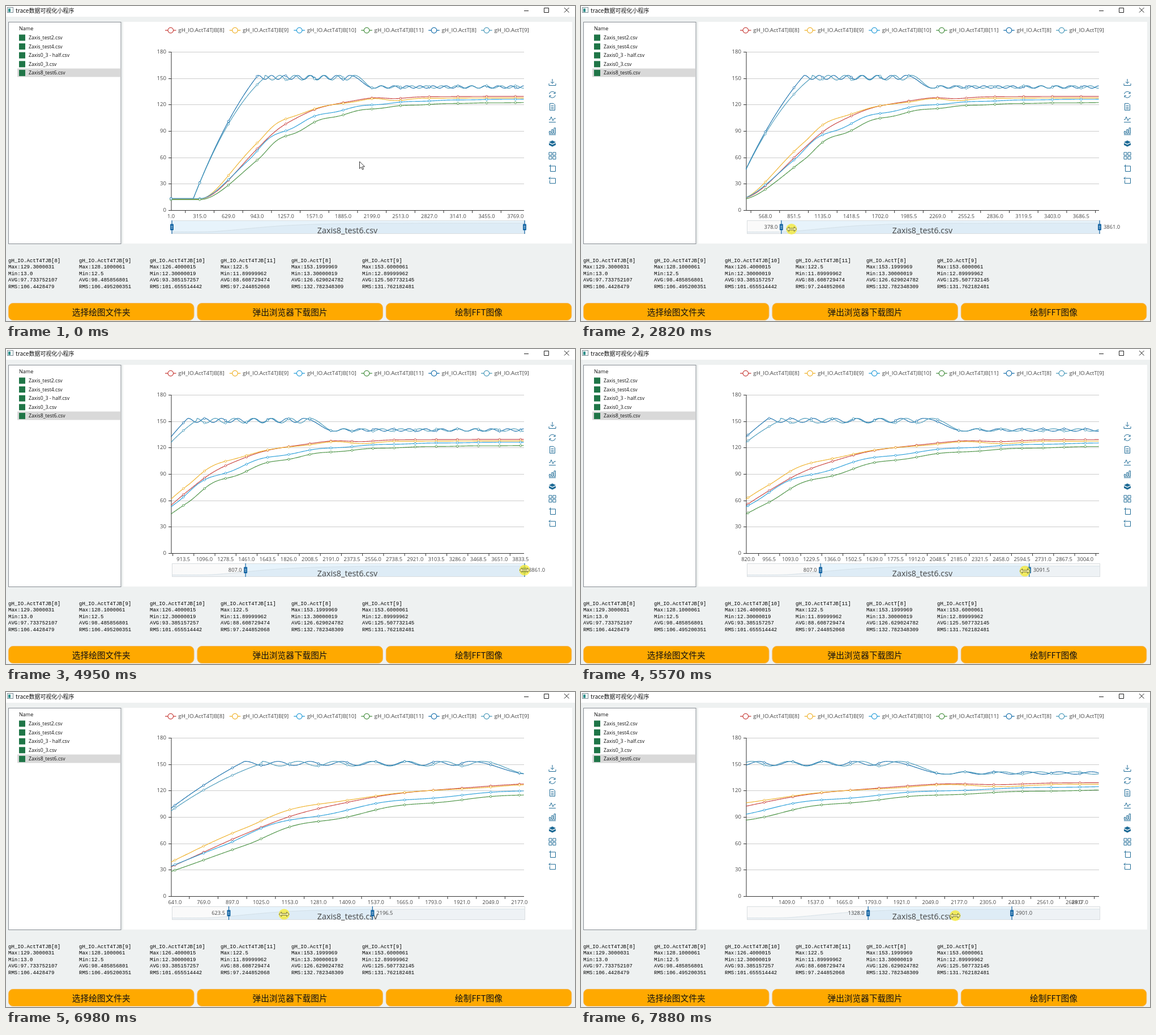
Write an HTML page that moves like this. It is 1005 px wide and 557 px high and loops after 8 s.

```html
<!DOCTYPE html>
<html lang="zh">
<head>
<meta charset="utf-8">
<style>
html, body { margin: 0; width: 100%; height: 100%; overflow: hidden; background: #eef1f1; }
svg { display: block; width: 100%; height: 100%; }
text { font-family: "Open Sans", "Noto Sans CJK SC", "Noto Sans", sans-serif; dominant-baseline: central; fill: #464646; white-space: pre; }
.cjk { font-family: "Noto Sans CJK SC", "Noto Sans CJK", sans-serif; }
.mono { font-family: "Liberation Mono", monospace; fill: #000; }
.dark { fill: #111; }
</style>
</head>
<body>
<svg viewBox="0 0 1005 557"><g id="fixed"></g><g id="live"></g></svg>
<script>
const LOOP = 8000, L = 291.5, W = 623, Y0 = 361, UNIT = 280 / 180;
const FIRST = 1, LAST = 3861, SLIDER = 293.5;
const COLORS = ['#c9433f', '#efb22c', '#2b9fd9', '#4a9244', '#1b72ad', '#4b9bbb'];
const NAMES = ['T4TJB[8]', 'T4TJB[9]', 'T4TJB[10]', 'T4TJB[11]', 'T[8]', 'T[9]'].map(n => 'gH_IO.Act' + n);
const BLUE = '#1e6b96', HANDLE = '#1767a5';

// ---- markup helpers
const text = (x, y, s, size, extra = '') => `<text x="${x}" y="${y}" font-size="${size}" ${extra}>${s}</text>`;
const rect = (x, y, w, h, fill, extra = '') => `<rect x="${x}" y="${y}" width="${w}" height="${h}" fill="${fill}" ${extra}/>`;
const path = (d, stroke, extra = '', fill = 'none') => `<path d="${d}" fill="${fill}" stroke="${stroke}" ${extra}/>`;
const circle = (x, y, r, fill, extra = '') => `<circle cx="${x}" cy="${y}" r="${r}" fill="${fill}" ${extra}/>`;
const MID = 'text-anchor="middle"', END = 'text-anchor="end"';
const within = (v, a, b) => v >= a && v < b;

// ---- data curves
// Winding temperature: slow start, exponential approach, fading ripple, small overshoot at the end.
function winding({ low, high, inertia, drag, ripple = 0, onset = 640, period = 450, fade = 700, settle = 0 }) {
  return x => {
    const u = Math.max(0, x - 315), r = u - onset, z = u - 2030;
    const base = high - (high - low) * Math.exp(-u * u / (inertia + drag * u));
    const wobble = r > 0 ? ripple * Math.sin(Math.PI * r / period) ** 2 * Math.exp((period / 2 - r) / fade) : 0;
    return base + wobble - settle * Math.sin(Math.PI * z / 340) * Math.exp(-((z / 300) ** 2));
  };
}
// Motor load: climb to the peak, swing, drop to the lower level, swing less.
function motor({ low, bend, peak, last, mid, amp, period }) {
  const DOWN = 2227, BOTTOM = 138.6, top = mid + amp;
  const swing = (x, from) => Math.cos((x - from) / period * 2 * Math.PI);
  return x => {
    const w = Math.max(0, x - 245);
    if (x < peak) return Math.min(top, low + w * (.2645 - bend * w));
    if (x < last) return mid + amp * swing(x, peak);
    if (x < DOWN) return top - (top - BOTTOM) * (1 - Math.cos(Math.PI * (x - last) / (DOWN - last))) / 2;
    return 140 - 1.4 * swing(x, DOWN);
  };
}
const series = [
  winding({ low: 13, high: 129.3, inertia: 4e5, drag: 304, ripple: 1, settle: 1.5 }),
  winding({ low: 12.8, high: 127.6, inertia: 2.58e5, drag: 368, ripple: 3.5, period: 500, fade: 250, settle: 2.2 }),
  winding({ low: 13.2, high: 126.4, inertia: 3.05e5, drag: 527, ripple: 5.2, onset: 540, period: 490 }),
  winding({ low: 12, high: 122.5, inertia: 4.6e5, drag: 475, ripple: 5 }),
  motor({ low: 13.3, bend: 94e-6, peak: 958, last: 1954.8, mid: 150.9, amp: 2.3, period: 142.4 }),
  motor({ low: 13, bend: 113e-6, peak: 1028, last: 2006, mid: 150.6, amp: 2.7, period: 163 })
];
const yOf = v => +(Y0 - v * UNIT).toFixed(2);

// ---- motion: each move is [begin, end, target...]
function follow(from, moves, t) {
  let at = from;
  for (const [a, b, ...to] of moves) {
    if (t <= a) break;
    const u = Math.min(1, (t - a) / (b - a));
    at = at.map((v, i) => v + (to[i] - v) * u);
  }
  return at;
}
const startMoves = [[2150, 2180, 6], [2180, 3558, 807], [6720, 7250, 433], [7330, 7880, 1328]];
const endMoves = [[5010, 6060, 2418.5], [6260, 6390, 2380]];
const mouseMoves = [[70, 760, 286, 393], [1020, 1300, 292.5, 390.5], [2090, 2180, 319, 391], [2180, 3450, 424, 398],
  [3620, 4250, 957, 399], [4400, 4550, 916, 391], [4960, 6060, 678, 394], [6300, 6640, 548, 393],
  [6720, 7150, 454, 393], [7300, 7880, 661, 395.5]];
const PAN = 6720;
const half = v => Math.round(v * 2) / 2;
const startAt = t => half(follow([FIRST], startMoves, t)[0]);
function range(t) {
  const s = startAt(t), pan = t > PAN ? s - startAt(PAN) : 0;
  return [s, half(follow([LAST], endMoves, t)[0]) + pan];
}
const pressed = t => within(t, 1630, 3620) || within(t, 4820, 6400) || t >= 6650;
const wideLabels = t => t < 2170 || within(t, 2800, 3500) || t >= 6970;

// ---- live parts
function chart(t) {
  const [s, e] = range(t), scale = (e - s) / W;
  const xOf = (v, from = s) => L + (v - from) / scale;
  const step = (Math.floor(2 * scale * (wideLabels(t) ? 50.67 : 37.15)) + 1) / 2;
  const marks = [];
  for (let v = FIRST + Math.ceil((s - FIRST) / step) * step; v <= e; v += step) marks.push(v);

  // labels trail behind while the window is being panned
  const [oldS, oldE] = t > 7040 ? range(t - 62) : [s, e];
  let out = '', ticks = '';
  const tick = x => { if (within(x, L, L + W + 1)) ticks += `M${x.toFixed(1)} ${Y0}v5`; };
  marks.forEach((v, i) => {
    const x = xOf(v, within(v, oldS, oldE + .1) ? oldS : s);
    out += text(x.toFixed(1), 371.5, v.toFixed(1), 9.3, MID);
    tick(x - step / scale / 2);
    if (i == marks.length - 1) tick(x + step / scale / 2);
  });
  out += path(ticks, '#333');

  series.forEach((f, i) => {
    let d = '';
    for (let p = 0; p <= W; p++) d += `${p ? 'L' : 'M'}${L + p} ${yOf(f(s + p * scale))}`;
    out += path(d, COLORS[i], 'stroke-width="1.15" stroke-linejoin="round"');
    for (const v of marks) out += circle(xOf(v).toFixed(1), yOf(f(v)), 1.8, '#fff', `stroke="${COLORS[i]}" stroke-width=".9"`);
  });
  return out;
}

let shade = '';
for (let p = 0; p <= W; p += 7)
  shade += `${p ? 'L' : 'M'}${SLIDER + p} ${(401.2 - .134 * series[0](FIRST + p * (LAST - FIRST) / W)).toFixed(1)}`;

function slider(t, hover) {
  const [s, e] = range(t);
  const [a, b] = [s, e].map(v => SLIDER - .5 + (v - FIRST) / (LAST - FIRST) * W);
  const handle = x => path(`M${x} 379V403`, HANDLE, 'stroke-width="1.2"') + rect(x - 3, 385.5, 6, 11, HANDLE, 'rx=".8"') +
    path(`M${x - 1.5} 389.5h3m-3 3h3`, '#fff', 'stroke-width=".9"');
  return rect(SLIDER, 379.5, W, 23, '#fafafa') + rect(a, 379.5, b - a, 23, '#e7f3fb') +
    path(`${shade}V402.5H${SLIDER}Z`, 'none', 'fill-opacity=".17"', '#b4c8d8') + path(shade, '#cfdbe3', 'stroke-width=".8"') +
    rect(SLIDER, 379.5, W, 23, 'none', 'stroke="#d9dde0"') +
    text(603, 396, 'Zaxis8_test6.csv', 14.3, MID) + handle(a) + handle(b) +
    (hover ? text(a - 6.5, 390, s.toFixed(1), 9.3, END) + text(b + 7, 390, e.toFixed(1), 9.3) : '');
}

function pointer(x, y, resize, down) {
  const icon = resize
    ? (down ? circle(0, 0, 9.5, '#f5ea2c', 'opacity=".75"') : '') +
      path('M-9 0L-4.5-4V-1.5H4.5V-4L9 0L4.5 4V1.5H-4.5V4Z', '#55542c', 'stroke-width=".8"', down ? '#f5efa0' : '#fff')
    : path('M0 0V12.5L3 9.8L5 14.3L7 13.4L5.1 9H9Z', '#222', 'stroke-width=".9"', '#fff');
  return `<g transform="translate(${x.toFixed(1)} ${y.toFixed(1)})">${icon}</g>`;
}

// ---- fixed parts
const TOOLS = [
  'M0-6V2M-3-1L0 2L3-1M-6 2V5.5H6V2',
  'M-5.5-1A5.5 5.5 0 0 1 5-2M5.5 1A5.5 5.5 0 0 1-5 2M5-5V-2H2M-5 5V2H-2',
  'M-4.5-6H2L4.5-3.5V6H-4.5ZM-2.5-2H2.5M-2.5 1H2.5M-2.5 3.5H2.5',
  'M-6 1H-4L-2-4L1 3L3-1H6M-6 5.5H6',
  'M-5.5 4V0H-3V4ZM-1.2 4V-3H1.2V4ZM3 4V-6H5.5V4ZM-6 6H6',
  'M0-5.5L6-2.5L0 .5L-6-2.5ZM-6-1V2.5L0 5.5L6 2.5V-1L0 2Z',
  'M-6-6H-1V-1H-6ZM1-6H6V-1H1ZM-6 1H-1V6H-6ZM1 1H6V6H1Z',
  'M-6-3.5H5.5V6H-3.5V-6',
  'M-6-3.5H5.5V5.5H-4.5V0M-3.5-6L-6-3.5L-3.5-1'
];
const STATS = ['129.3000031 13.0 97.733752107 106.4428479', '128.1000061 12.5 98.485856801 106.495200351',
  '126.4000015 12.30000019 93.385157257 101.655514442', '122.5 11.89999962 88.608729474 97.244852068',
  '153.1999969 13.30000019 126.629024782 132.782348309', '153.6000061 12.89999962 125.507732145 131.762182481'];

function windowFrame() {
  let out = rect(0, 0, 1005, 19, '#fff') + rect(2.5, 2.5, 10, 9, '#fff', 'stroke="#7b8b93"') + rect(4, 4.5, 4, 6, '#2f8f8a') +
    text(17, 7.5, 'trace数据可视化小程序', 10, 'class="cjk dark"') +
    path('M915 8.5h8M950.5 3.5h8v8h-8ZM986 3l8.5 8.5m0-8.5l-8.5 8.5', '#222') +
    rect(4.5, 28.5, 198.5, 392, '#fff', 'stroke="#868c92"') + rect(20, 110.5, 182.5, 15, '#d9d9d9') +
    text(23, 39, 'Name', 9, 'class="dark"') + rect(207, 28, 793, 392, '#fff');
  ['Zaxis_test2', 'Zaxis_test4', 'Zaxis0_3 - half', 'Zaxis0_3', 'Zaxis8_test6'].forEach((n, i) => {
    const y = 56 + 15.6 * i;
    out += rect(23, y - 5.5, 11, 11, '#1f7547') + text(40, y, n + '.csv', 8.7, 'class="dark"');
  });
  return out;
}

function chartFrame() {
  let out = '', x = 281;
  NAMES.forEach((name, i) => {
    out += path(`M${x} 43h19.5`, COLORS[i], 'stroke-width="1.3"') +
      circle(x + 9.8, 43, 4.8, '#fff', `stroke="${COLORS[i]}" stroke-width="1.2"`) + text(x + 23.3, 42, name, 9.8);
    x += 113.7 + (name.length - 17) * 5.2;
  });
  for (let v = 0; v <= 180; v += 30) {
    const y = Math.round(yOf(v)) + .5;
    out += (v ? path(`M292 ${y}H915`, '#ccc') : '') + path(`M287 ${y}h5`, '#333') + text(283, y - .7, v, 9.6, END);
  }
  out += path('M292 81V361.5H915', '#333');
  TOOLS.forEach((d, i) => {
    const solid = i == 5;
    out += path(d, solid ? 'none' : BLUE, `transform="translate(965 ${(135 + 21.65 * i).toFixed(1)})"`, solid ? BLUE : 'none');
  });
  return out;
}

function footer() {
  let out = '';
  STATS.forEach((row, i) => {
    const lines = row.split(' ').map((v, j) => ['Max', 'Min', 'AVG', 'RMS'][j] + ':' + v);
    [NAMES[i], ...lines].forEach((s, j) => out += text(4 + 125 * i, 450 + 11.6 * j, s, 9.05, 'class="mono"'));
  });
  ['选择绘图文件夹', '弹出浏览器下载图片', '绘制FFT图像'].forEach((s, i) => {
    const x = 4.5 + 333.4 * i;
    out += rect(x, 525.5, 327.5, 30, '#ffa900', 'rx="8" stroke="#f3b659"') +
      text(x + 163.7, 540.5, s, 14.7, MID + ' class="cjk dark"');
  });
  return out;
}

document.getElementById('fixed').innerHTML = windowFrame() + chartFrame() + footer();
const live = document.getElementById('live');
function draw() {
  const t = Math.floor(performance.now() % LOOP / 10) * 10;
  const [x, y] = follow([624.5, 275], mouseMoves, t), down = pressed(t);
  const hover = down || (within(x, 289, 921) && within(y, 379, 404));
  live.innerHTML = chart(t) + slider(t, hover) + pointer(x, y, hover, down);
  requestAnimationFrame(draw);
}
draw();
</script>
</body>
</html>
```
